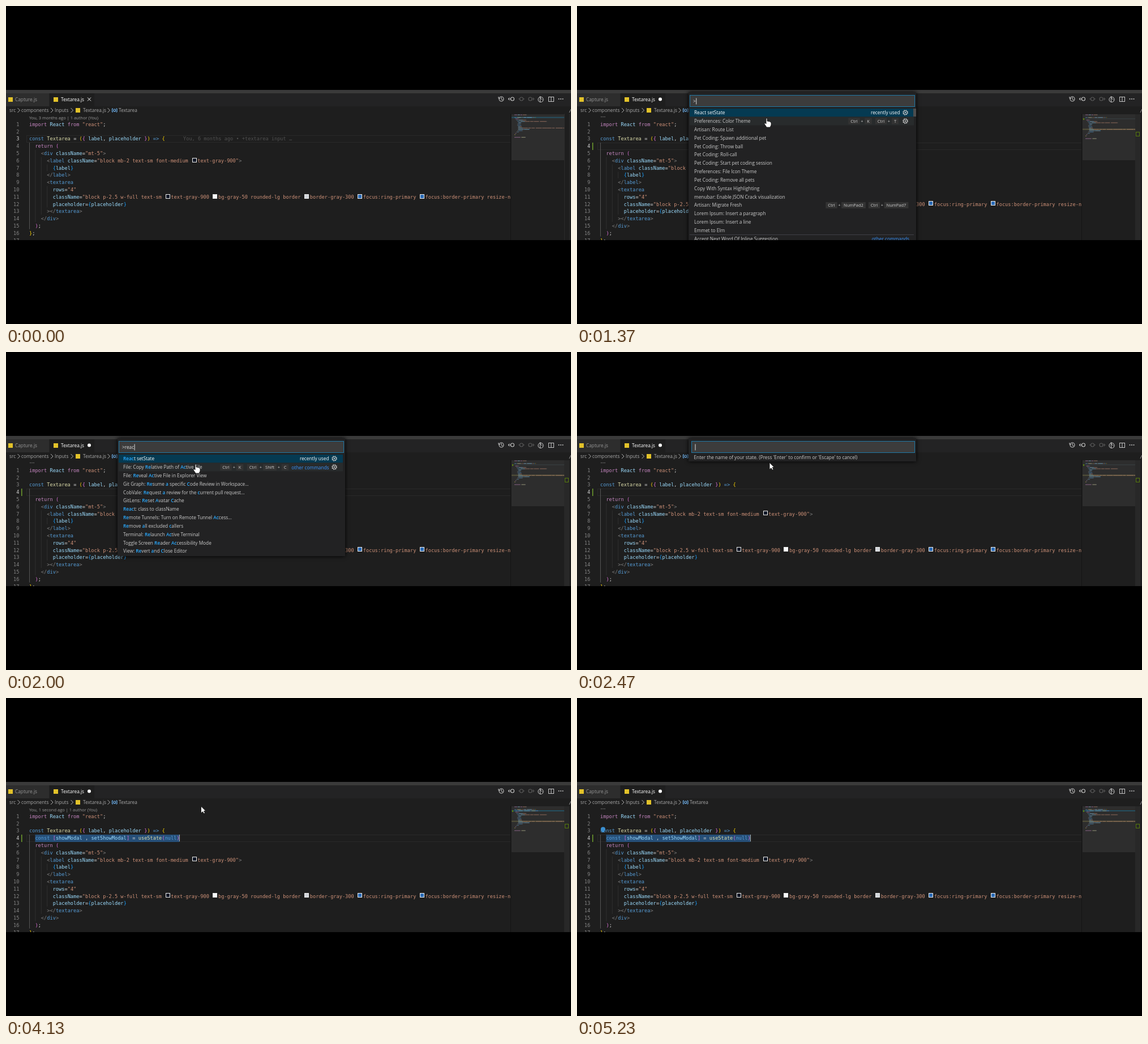
Animation, 998 px wide and 561 px high, one loop 5.26 s. Source, as an HTML page with a canvas:

```html
<!DOCTYPE html>
<html>
<head>
<meta charset="utf-8">
<style>
html, body { margin: 0; width: 100%; height: 100%; overflow: hidden; background: #000; }
canvas { display: block; }
</style>
</head>
<body>
<canvas id="stage" width="998" height="561"></canvas>
<script>
const c = document.getElementById('stage').getContext('2d');
const LOOP = 5260, CHAR = 5.21, LINE = 12.8, LEFT = 41, TOP = 208.6;
const UI = '"Open Sans", "Noto Sans", sans-serif', MONO = '"DejaVu Sans Mono", monospace';

// Event times in ms
const NEWLINE = 600, SAVED_STATE = 1000, OPEN = 1230, PROMPT = 2350, INSERT = 3715;

const COLORS = {
  k: '#c586c0', b: '#569cd6', v: '#9cdcfe', f: '#dcdcaa', s: '#ce9178', w: '#d4d4d4',
  a: '#808080', y: '#ffd700', o: '#da70d6', u: '#179fff'
};
const SWATCHES = ['#111827', '#f9fafb', '#d1d5db', '#2b6cb8'];

// "§" plus a letter sets the colour, "§" plus a digit draws a swatch
const SOURCE = [
  '§kimport §vReact §kfrom §s"react"§w;',
  '',
  '§bconst §fTextarea §w= §y(§o{ §vlabel§w, §vplaceholder §o}§y) §b=> §y{',
  '  §kreturn §o(',
  '    §a<§bdiv §vclassName§w=§s"mt-5"§a>',
  '      §a<§blabel §vclassName§w=§s"block mb-2 text-sm font-medium §0text-gray-900"§a>',
  '        §u{§vlabel§u}',
  '      §a</§blabel§a>',
  '      §a<§btextarea',
  '        §vrows§w=§s"4"',
  '        §vclassName§w=§s"block p-2.5 w-full text-sm §0text-gray-900 §1bg-gray-50 rounded-lg border §2border-gray-300 §3focus:ring-primary §3focus:border-primary resize-none"',
  '        §vplaceholder§w=§u{§vplaceholder§u}',
  '      §a></§btextarea§a>',
  '    §a</§bdiv§a>',
  '  §o)§w;',
  '§y}§w;',
  '',
  '§kexport default §fTextarea§w;'
];
const HOOK = '  §bconst §o[§vshowModal §w, §vsetShowModal§o] §w= §fuseState§o(§bnull§o)';
const BLAME = 'You, 6 months ago • +textarea input …';

const RECENT = [
  'React setState', 'Preferences: Color Theme', 'Artisan: Route List',
  'Pet Coding: Spawn additional pet', 'Pet Coding: Throw ball', 'Pet Coding: Roll-call',
  'Pet Coding: Start pet coding session', 'Preferences: File Icon Theme',
  'Pet Coding: Remove all pets', 'Copy With Syntax Highlighting',
  'menubar: Enable JSON Crack visualization', 'Artisan: Migrate Fresh',
  'Lorem Ipsum: Insert a paragraph', 'Lorem Ipsum: Insert a line', 'Emmet to Elm',
  'Accept Next Word Of Inline Suggestion'
];
// Matched letters stand between asterisks
const MATCHES = [
  '*Reac*t setState', 'File: Copy *Re*lative Path of *Ac*tive File',
  'File: *Re*veal *Ac*tive File in Explorer View',
  'Git Graph: *Re*sume *a* specific *C*ode Review in Workspace...',
  'CobVale: *Re*quest *a* review for the *c*urrent pull request...',
  'GitLens: *Re*set *A*vatar *C*ache', '*Reac*t: class to className',
  '*Re*mote Tunnels: Turn on Remote Tunnel *Ac*cess...',
  '*Re*move *a*ll excluded *c*allers', 'Terminal: *Re*launch *Ac*tive Terminal',
  'Toggle Screen *Re*ader *Ac*cessibility Mode', 'View: *Re*vert *a*nd *C*lose Editor'
];

const lineY = n => TOP + (n - 1) * LINE;

function rect(x, y, w, h, color) {
  c.fillStyle = color;
  c.fillRect(x, y, w, h);
}
function frame(x, y, w, h, color) {
  c.strokeStyle = color;
  c.lineWidth = 1;
  c.strokeRect(x + .5, y + .5, w - 1, h - 1);
}
function path(color, ...runs) {
  c.strokeStyle = color;
  c.lineWidth = 1;
  c.beginPath();
  for (const p of runs)
    for (let i = 0; i < p.length; i += 2) i ? c.lineTo(p[i], p[i + 1]) : c.moveTo(p[i], p[i + 1]);
  c.stroke();
}
function ring(x, y, r, color) {
  c.strokeStyle = color;
  c.lineWidth = 1.1;
  c.beginPath();
  c.arc(x, y, r, 0, 7);
  c.stroke();
}
function dot(x, y, r, color) {
  c.fillStyle = color;
  c.beginPath();
  c.arc(x, y, r, 0, 7);
  c.fill();
}
function text(s, x, y, color = '#ccc', size = 8.28, align = 'left', family = UI, weight = 400) {
  c.font = `${weight} ${size}px ${family}`;
  c.textAlign = align;
  c.fillStyle = color;
  c.fillText(s, x, y + size * .36);
  return c.measureText(s).width;
}
const mono = (s, x, y, color, align) => text(s, x, y, color, 8.65, align, MONO);

function code(line, x, y) {
  const [indent, ...tokens] = line.split('§');
  x += indent.length * CHAR;
  for (const token of tokens) {
    const kind = token[0], s = token.slice(1);
    if (kind < '9') {
      const left = Math.round(x + 1), top = Math.round(y) - 5;
      rect(left, top, 8, 8, SWATCHES[kind]);
      frame(left, top, 8, 8, '#eee');
      x += 10.7;
    }
    mono(s, x, y, COLORS[kind] || COLORS.s);
    x += s.length * CHAR;
  }
}

function minimap(lines, t) {
  const x0 = 893, pitch = 2.33;
  c.save();
  c.beginPath();
  c.rect(x0, 190, 93, 223);
  c.clip();
  rect(x0, 191, 93, 81, '#2d2d2d');
  const current = t < NEWLINE ? 3 : 4;
  rect(x0, 191 + (current - 1) * pitch, 93, 2, t < NEWLINE || t > INSERT ? '#264f60' : '#34383a');
  if (t >= NEWLINE) {
    rect(x0, 216.5, 93, 2, '#55523a');
    rect(894, 198, 2, 3, '#587c0c');
  }
  c.globalAlpha = .5;
  lines.forEach((line, i) => {
    const [indent, ...tokens] = line.split('§');
    let x = 898 + indent.length * .82;
    for (const token of tokens) {
      for (const word of token.slice(1).split(/(?= )/)) {
        rect(x, 191.4 + i * pitch, word.trim().length * .82, 1.2, COLORS[token[0]] || COLORS.s);
        x += word.length * .82;
      }
    }
  });
  c.restore();
  path('#151515', [891.5, 190, 891.5, 413]);
}

function toolbar() {
  const hi = '#c5c5c5', lo = '#5a5a5a', y = 164;
  ring(875, y, 4, hi);
  path(hi, [875, 161, 875, 164.5, 877.5, 165.5], [870, 160, 870, 163, 873, 163]);
  ring(894.5, y, 3, hi);
  path(hi, [891, y, 887, y], [889.5, 161.5, 887, y, 889.5, 166.5]);
  ring(910.5, y, 3, lo);
  path(lo, [905, y, 907.5, y], [913.5, y, 916, y]);
  ring(926, y, 3, lo);
  path(lo, [929, y, 933, y], [930.5, 161.5, 933, y, 930.5, 166.5]);
  ring(944.5, 165, 4.5, hi);
  path(hi, [943.5, 159, 943.5, 170], [944, 162, 947, 165.5]);
  frame(958, 160, 10, 9, hi);
  path(hi, [963, 160, 963, 169]);
  for (const x of [976.5, 980, 983.5]) dot(x, y, 1, hi);
}

function header(t) {
  rect(0, 148, 998, 6, '#3a3a3a');
  rect(0, 154, 998, 23, '#232324');
  rect(0, 154, 76, 23, '#2d2d2d');
  rect(77, 154, 79, 23, '#1e1e1e');
  rect(4, 161, 8, 8, '#e2c229');
  text('Capture.js', 16, 165, '#969696');
  rect(84, 161, 8, 8, '#e2c229');
  text('Textarea.js', 97, 165, '#fff');
  if (t < NEWLINE) path('#fff', [144, 161.5, 150, 167.5], [150, 161.5, 144, 167.5]);
  else dot(147, 164.5, 3, '#fff');
  toolbar();
  for (const [s, x] of [['src', 6], ['components', 27], ['Inputs', 86], ['Textarea.js', 136], ['Textarea', 199]])
    text(s, x, 184.5, '#a9a9a9');
  for (const x of [20.5, 79, 114.5, 179.5]) path('#b0b0b0', [x, 180, x + 4, 184, x, 188]);
  rect(123, 180, 8, 8, '#e2c229');
  path('#75beff', [189, 181, 187.5, 181, 187.5, 187, 189, 187], [194.5, 181, 196, 181, 196, 187, 194.5, 187]);
  ring(191.8, 184, 2, '#75beff');
  path('#999', [995, 188, 998, 182]);
}

function editor(t) {
  const lines = [...SOURCE], current = t < NEWLINE ? 3 : 4;
  if (t >= NEWLINE) lines.splice(3, 0, t < INSERT ? '' : HOOK);
  rect(0, 148, 998, 265, '#1e1e1e');
  minimap(lines, t);

  if (t < NEWLINE) path('#2b2b2b', [986.5, 190, 986.5, 413], [995.5, 190, 995.5, 413]);
  else {
    rect(986, 191, 9, 222, t < OPEN ? '#424242' : '#282828');
    if (t < OPEN) for (const y of [214, 329]) rect(989, y, 4, 8, '#a0a0a0');
    if (t > SAVED_STATE) frame(987, 222, 7, 8, '#587c0c');
  }

  const showLens = t < SAVED_STATE || (t > 3900 && t < 4550);
  if (showLens) text(`You, ${t < SAVED_STATE ? '3 months' : '1 second'} ago | 1 author (You)`, LEFT, 197, '#999', 7.5);
  else for (let i = 0; i < 3; i++) dot(43 + i * 3, 195.5, .7, '#999');

  c.save();
  c.beginPath();
  c.rect(0, 190, 891, 223);
  c.clip();
  frame(36, Math.round(lineY(current)) - 6, 860, 13, '#292929');
  const shift = current - 3;
  [[4, 15], [5, 14], [6, 13], [7, 12]].forEach(([from, to], i) => {
    const x = LEFT + .5 + i * 2 * CHAR;
    const start = i ? from + shift : from;
    const end = i == 3 ? 7 : to;
    path(i ? '#303030' : '#555', [x, lineY(start) - 6, x, lineY(end + shift) + 6]);
    if (i == 3) path('#303030', [x, lineY(10 + shift) - 6, x, lineY(to + shift) + 6]);
  });
  if (t >= INSERT) rect(51.4, 241, 255, 13, '#264f78');
  if (t > SAVED_STATE) rect(27, 241, 1.5, 13, '#6f9d2c');

  lines.slice(0, 17).forEach((line, i) => {
    const y = lineY(i + 1);
    mono(i + 1, 23.5, y, i + 1 == current ? '#d0d0d0' : '#858585', 'right');
    code(line, LEFT, y);
  });
  if (t < NEWLINE) mono(BLAME, 313, lineY(3), '#505050');
  else if (t < SAVED_STATE) mono(BLAME, 85, lineY(4), '#505050');
  if (t >= NEWLINE && t < OPEN) {
    frame(274, 228, 6, 12, '#999');
    frame(41, 408, 6, 12, '#999');
    rect(51, 241, 1, 12, '#aeafad');
  }
  if (t >= INSERT) rect(306, 241, 1, 12, '#aeafad');
  if (t > 4600) {
    dot(46, 231.5, 4, '#3b8fd0');
    rect(44, 235, 4, 2, '#3b8fd0');
  }
  c.restore();
}

function gear(x, y) {
  c.setLineDash([1.7, 1.7]);
  ring(x, y, 4.3, '#ccc');
  c.setLineDash([]);
  ring(x, y, 3.2, '#ccc');
  dot(x, y, 1.2, '#ccc');
}
function keys(y, ...list) {
  for (const [s, x] of list) {
    if (s != '+') {
      c.font = `7.5px ${UI}`;
      const w = c.measureText(s).width + 8;
      rect(x - w / 2, y - 5.5, w, 11, '#333');
    }
    text(s, x, y, '#ccc', 7.5, 'center');
  }
}
function panel(bottom, inputX, value) {
  c.save();
  c.shadowColor = '#000';
  c.shadowBlur = 7;
  rect(197, 152, 402, bottom - 152, '#222223');
  c.restore();
  rect(inputX, 157, 597 - inputX, 21, '#3c3c3c');
  frame(inputX, 157, 597 - inputX, 21, '#1f78a6');
  const w = text(value, inputX + 6, 168, '#ddd');
  rect(inputX + 6.5 + w, 162.5, 1, 11, '#ddd');
}

const typed = (s, times, t) => s.slice(0, times.filter(at => t >= at).length);

function palette(t) {
  const query = typed('react', [1680, 1780, 1870, 1960, 2090], t);
  const rows = query ? MATCHES : RECENT;
  const rowY = i => 188.3 + i * 14.83;
  panel(query ? 360 : 420, 199, '>' + query);
  rect(199, 181, 396, 14.5, '#053a52');
  rect(199, 195.5, 396, 15, '#282b2c');
  rows.forEach((row, i) => {
    let x = 207;
    row.split('*').forEach((part, j) => {
      x += text(part, x, rowY(i), j % 2 ? '#2aaaff' : i ? '#ccc' : '#fff', 8.28, 'left', UI, j % 2 ? 600 : 400);
    });
  });
  text('recently used', 570.5, 188.3, '#fff', 8.28, 'right');
  gear(580, 188);
  gear(580, 203);
  if (query) {
    keys(203.5, ['Ctrl', 388.5], ['+', 403], ['K', 413], ['Ctrl', 436], ['+', 450], ['Shift', 466], ['+', 482], ['C', 493]);
    text('other commands', 570.5, 203.8, '#3794ff', 8.28, 'right');
  } else {
    keys(203, ['Ctrl', 489.5], ['+', 503.5], ['K', 514.5], ['Ctrl', 537], ['+', 551], ['T', 562]);
    keys(351.5, ['Ctrl', 449.5], ['+', 463.5], ['NumPad2', 488.5], ['Ctrl', 525], ['+', 539], ['NumPad7', 564]);
    rect(199, 403, 396, 1, '#3f3f46');
    text('other commands', 587, 411, '#3794ff', 8.28, 'right');
    rect(594, 181, 5, 14, '#4d4d4d');
  }
}

function prompt(t) {
  const value = typed('showModal', [2930, 3070, 3260, 3320, 3380, 3440, 3500, 3560, 3620], t);
  panel(193, 202, value);
  text("Enter the name of your state. (Press 'Enter' to confirm or 'Escape' to cancel)", 206.5, 186.3);
}

function shape(points, x, y, fill, line) {
  c.beginPath();
  for (let i = 0; i < points.length; i += 2) c.lineTo(x + points[i], y + points[i + 1]);
  c.closePath();
  c.fillStyle = fill;
  c.fill();
  c.strokeStyle = line;
  c.lineWidth = .8;
  c.stroke();
}
function between(t, from, to, a, b) {
  let p = Math.min(1, Math.max(0, (t - from) / (to - from)));
  p = p * p * (3 - 2 * p);
  return a.map((v, i) => v + (b[i] - v) * p);
}
function pointer(t) {
  if (t < 200 || t > 5150) return;
  if (t < OPEN) {
    const [x, y] = between(t, 200, 520, [560, 140], [338, 204]);
    path('#050505', [x, y - 5, x, y + 5], [x - 2, y - 5, x + 2, y - 5], [x - 2, y + 5, x + 2, y + 5]);
  } else if (t < PROMPT) {
    shape([-4, -8, -2, -8, -2, -3, 3, -2, 5, 0, 5, 4, 3, 8, -3, 8, -7, 2, -6, 0, -4, 2], 338, 206, '#fff', '#111');
  } else {
    const [x, y] = t < 4800
      ? between(t, PROMPT, 2600, [336, 199], [344.5, 191])
      : between(t, 4800, 5150, [344.5, 191], [620, 416]);
    shape([0, 0, 0, 12, 3, 9.5, 5, 13, 7, 12, 5, 8.5, 8, 8], x, y, '#fff', '#111');
  }
}

function draw() {
  const t = performance.now() % LOOP;
  rect(0, 0, 998, 561, '#000');
  c.save();
  c.beginPath();
  c.rect(0, 148, 998, 265);
  c.clip();
  editor(t);
  header(t);
  if (t >= OPEN && t < PROMPT) palette(t);
  else if (t >= PROMPT && t < 3690) prompt(t);
  pointer(t);
  c.restore();
  requestAnimationFrame(draw);
}
draw();
</script>
</body>
</html>
```
